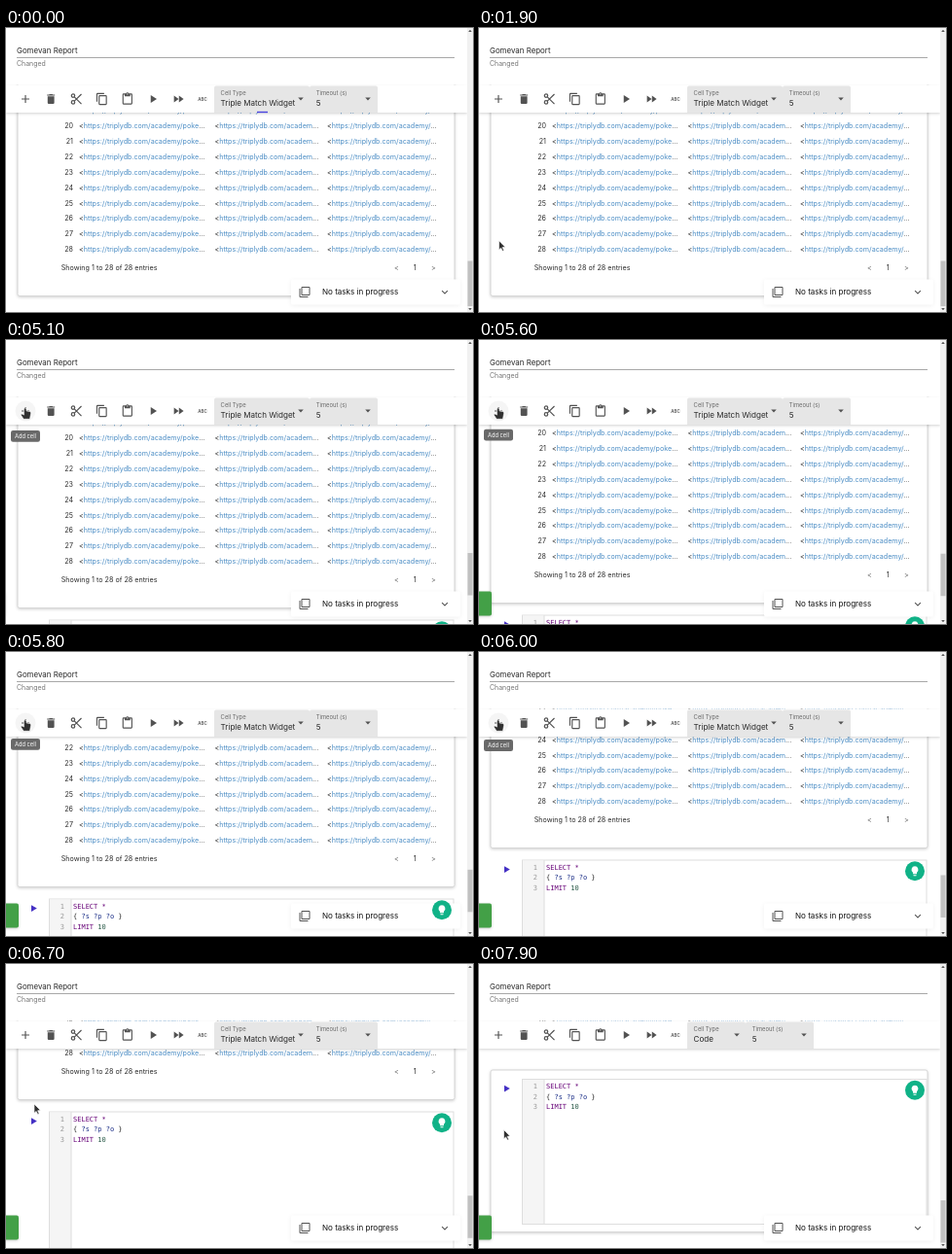
Recreate the animation shown at these times as an HTML page. Size 480 by 292 pixels, loop 8000 ms.

```html
<!DOCTYPE html>
<html lang="en">
<head>
<meta charset="utf-8">
<title>Notebook report</title>
<style>
  html, body { margin: 0; width: 100%; height: 100%; overflow: hidden; background: #fff; }
  svg { display: block; width: 100vw; height: 100vh; font-family: Inter, sans-serif; }
  text { fill: #2a2a2a; white-space: pre; }
  .code { font: 7px "DejaVu Sans Mono", monospace; }
  .label { font-size: 5.9px; fill: #6a6a6a; }
  .value { font-size: 8.05px; }
  .icon { fill: #525252; }
  .raised { filter: drop-shadow(0 1px 1.5px rgba(0, 0, 0, .18)); }
  .kw { fill: #660077; }
  .var { fill: #1c2f88; }
  .num { fill: #2a5a48; }
  .link { fill: #4a8cc4; }
</style>
</head>
<body>
<svg viewBox="0 0 480 292" preserveAspectRatio="none">
  <g id="page">
    <rect id="card" class="raised" x="12" width="449" rx="2" fill="#fff" stroke="#d6d6d6"/>
    <g id="table">
      <g id="rows" font-size="7.14"></g>
      <text x="56.7" y="249.2" font-size="7.2">Showing 1 to 28 of 28 entries</text>
      <g font-size="7.2" text-anchor="middle">
        <text x="401.5" y="249.2" style="fill:#666">&lt;</text>
        <text x="420.2" y="249.2">1</text>
        <text x="439.5" y="249.2" style="fill:#666">&gt;</text>
      </g>
    </g>
    <g id="cell" transform="translate(0 288)">
      <rect x="44.5" y="0" width="415.5" height="149" fill="#fff" stroke="#dedede"/>
      <rect x="45" y=".5" width="22" height="148" fill="#f5f5f5"/>
      <path d="M67 0v149" stroke="#ddd"/>
      <path d="M26 6.3l5.8 3.3-5.8 3.3z" fill="#4430c4"/>
      <g id="numbers" class="code" text-anchor="end"></g>
      <text class="code" x="69" y="9.5"><tspan class="kw">SELECT</tspan> <tspan class="kw">*</tspan></text>
      <text class="code" x="69" y="20"><tspan>{ </tspan><tspan class="var">?s ?p ?o</tspan><tspan> }</tspan></text>
      <text class="code" x="69" y="30.5"><tspan class="kw">LIMIT</tspan> <tspan class="num">10</tspan></text>
    </g>
  </g>

  <rect class="raised" y="59" width="474" height="28" fill="#fff"/>
  <rect width="474" height="58.5" fill="#fff"/>
  <text x="11" y="25.6" font-size="7.9">Gomevan Report</text>
  <path d="M11 30.5h450" stroke="#a8a8a8"/>
  <text x="11" y="39.2" font-size="6.95" style="fill:#757575">Changed</text>
  <circle id="hover" cx="20" cy="73" r="10.5" fill="#000"/>
  <g id="tools"></g>
  <text x="202" y="74.6" font-size="4.4" font-weight="600" text-anchor="middle" style="fill:#525252">ABC</text>

  <path id="typeBox" fill="#e6e6e6"/>
  <path id="focus" stroke="#4a45e0" stroke-width="1.4"/>
  <text class="label" x="220.6" y="68.8">Cell Type</text>
  <text id="typeName" class="value" x="220.6" y="80"></text>
  <path id="typeArrow" class="icon" d="M-2.8-1.4h5.6l-2.8 2.8z"/>
  <g id="timeout">
    <path d="M312 87V61.5q0-2 2-2h66q2 0 2 2V87z" fill="#e6e6e6"/>
    <text class="label" x="318.7" y="68.8">Timeout (s)</text>
    <text class="value" x="318.7" y="80.2">5</text>
    <path class="icon" d="M369.2 71.6h5.6l-2.8 2.8z"/>
  </g>

  <rect x="293" y="258.5" width="174" height="26" rx="2" fill="#fff" style="filter:drop-shadow(0 1px 2px rgba(0,0,0,.06))"/>
  <g id="panelIcons"></g>
  <text class="value" x="325" y="274.4" style="fill:#111">No tasks in progress</text>

  <g id="hint">
    <circle r="10" fill="#10b287"/>
    <path transform="scale(.5) translate(-12 -12)" fill="#fff" d="M9 20h6v1q0 1-1 1h-4q-1 0-1-1zM12 2a7 7 0 0 0-4 12.7V17q0 1 1 1h6q1 0 1-1v-2.3A7 7 0 0 0 12 2z"/>
  </g>
  <rect id="snack" class="raised" x="-20" y="258.5" width="33" height="25" rx="2" fill="#43a047"/>

  <rect x="474" width="6" height="292" fill="#f1f1f1"/>
  <rect id="thumb" x="474.5" width="5" fill="#c1c1c1"/>
  <path d="M475.2 4l1.8-2.2L478.8 4zM475.2 288l1.8 2.2 1.8-2.2z" fill="#555"/>

  <g id="tip">
    <rect x="5" y="93" width="30" height="11.8" rx="2.2" fill="#616161" opacity=".95"/>
    <text x="20" y="101" font-size="5.7" text-anchor="middle" style="fill:#fff">Add cell</text>
  </g>
  <g id="cursor" stroke="#fff" stroke-width=".6" stroke-linejoin="round">
    <path id="arrow" fill="#303030" d="M0 0V9.2L2.1 7.4 3.7 10.6 5.1 9.9 3.6 6.8 6.4 6.4z"/>
    <path id="hand" fill="#303030" d="M-1.3 1q1.3-1.6 2.6 0v2.2l3.5.7q1.4.5 1.1 2L4.8 11.6H-1.6L-4.4 7.4q.2-1.6 1.8-.8L-1.3 7.4z"/>
    <path id="beam" fill="none" stroke="#333" stroke-width=".8" d="M-1.8-4.5Q0-4.5 0-3.5V3.5Q0 4.5-1.8 4.5M1.8-4.5Q0-4.5 0-3.5M0 3.5Q0 4.5 1.8 4.5"/>
  </g>
</svg>
<script>
const LOOP = 8000, STEP = 100;
const NEW_CELL = 5100, SELECT_CELL = 7600;
const $ = id => document.getElementById(id);
const set = (id, attrs) => {
  for (const k in attrs) $(id).setAttribute(k, attrs[k]);
};
const show = (id, on) => set(id, { visibility: on ? 'visible' : 'hidden' });

// time, scroll offset
const SCROLL = [[5500, 0], [5600, 5], [5700, 17], [5800, 34], [6000, 74], [6200, 109.5],
  [6300, 122], [6400, 131], [6500, 136], [6700, 136], [6800, 139], [7000, 156], [7200, 169.5]];
// time, x, y
const POINTER = [[1600, 10, 232], [1700, 12, 228], [2100, 29, 209.5], [2700, 29, 209.5],
  [3000, 27, 182], [3300, 23, 122], [3600, 19, 91], [3800, 19.7, 69.7], [6000, 19.7, 69.7],
  [6200, 23, 99.5], [6700, 29, 144], [7200, 24, 171.5], [7800, 24, 171.5], [7900, 25.5, 170.5]];
// time, opacity, vertical shift while the page scrolls
const TIP = [[3900, 0, 0], [4200, 1, 0], [5500, 1, 0], [5800, 1, -4], [6200, 1, -1.8], [6300, 1, -1], [6500, 0, 0]];
const SNACK = [[5100, -14], [5300, 0]];

function at(track, t) {
  const i = track.findIndex(k => k[0] > t);
  if (i === 0) return track[0].slice(1);
  if (i < 0) return track[track.length - 1].slice(1);
  const a = track[i - 1], b = track[i], p = (t - a[0]) / (b[0] - a[0]);
  return a.slice(1).map((v, j) => v + (b[j + 1] - v) * p);
}

const icon = (x, y, size, body) =>
  `<g class="icon" transform="translate(${x - size / 2} ${y - size / 2}) scale(${size / 24})">${body}</g>`;
const path = d => `<path d="${d}"/>`;

const tools = [
  path('M19 13h-6v6h-2v-6H5v-2h6V5h2v6h6z'),
  path('M6 19q0 2 2 2h8q2 0 2-2V7H6zM19 4h-3.5l-1-1h-5l-1 1H5v2h14z'),
  `<g fill="none" stroke="#525252" stroke-width="2.1"><circle cx="6" cy="6" r="3"/>
   <circle cx="6" cy="18" r="3"/><path d="M8.2 8.2L21 21M8.2 15.8L21 3.2"/></g>`,
  path('M16 1H4Q2 1 2 3v14h2V3h12zM19 5H8Q6 5 6 7v14q0 2 2 2h11q2 0 2-2V7q0-2-2-2zm0 16H8V7h11z'),
  path('M19 2h-4.2a3 3 0 0 0-5.6 0H5Q3 2 3 4v16q0 2 2 2h14q2 0 2-2V4q0-2-2-2zm-7 0a1 1 0 0 1 0 2 1 1 0 0 1 0-2zm7 18H5V4h2v3h10V4h2z'),
  path('M8 5v14l11-7z'),
  path('M4 18l8.5-6L4 6zM13 6v12l8.5-6z')
];
$('tools').innerHTML = tools.map((d, i) => icon(20 + 26.2 * i, 73, 13.65, d)).join('');
$('panelIcons').innerHTML =
  icon(307, 271.5, 12, path('M3 5H1v16q0 2 2 2h16v-2H3zM21 1H7Q5 1 5 3v14q0 2 2 2h14q2 0 2-2V3q0-2-2-2zm0 16H7V3h14z')) +
  icon(451, 271.5, 13, path('M16.6 8.6L12 13.2 7.4 8.6 6 10l6 6 6-6z'));

const base = 'https://triplydb.com/';
const columns = [[75, 'academy/poke'], [214.5, 'academ'], [330, 'academy/']];
let rows = '';
for (let n = 19; n <= 28; n++) {
  const y = 103.2 + 15.87 * (n - 20);
  rows += `<text x="69" y="${y}" text-anchor="end">${n}</text>`;
  for (const [x, end] of columns)
    rows += `<text x="${x}" y="${y}">&lt;<tspan class="link">${base}${end}</tspan>...</text>`;
}
$('rows').innerHTML = rows;
$('numbers').innerHTML = [1, 2, 3].map(n =>
  `<text x="60" y="${10.5 * n - 1}" style="fill:#999">${n}</text>`).join('');

function render(t) {
  const [scroll] = at(SCROLL, t);
  const added = t >= NEW_CELL, selected = t >= SELECT_CELL;

  set('page', { transform: `translate(0 ${-scroll})` });
  set('card', selected ? { y: 278.5, height: 166.5 } : { y: -20, height: 295.5 });
  show('cell', added);
  show('hint', added);
  set('hint', { transform: `translate(448 ${299.3 - scroll})` });
  set('thumb', added ? { y: 219 + scroll * 24 / 169.5, height: 43.5 } : { y: 239.5, height: 46.5 });

  const right = selected ? 274 : 312;
  set('typeBox', { d: `M214 87V61.5q0-2 2-2H${right - 2}q2 0 2 2V87z` });
  set('typeArrow', { transform: `translate(${right - 9} 73)` });
  set('timeout', { transform: `translate(${right - 312} 0)` });
  $('typeName').textContent = selected ? 'Code' : 'Triple Match Widget';

  const half = Math.max(0, 5.5 - t * .04);
  set('focus', { d: `M${263.5 - half} 86.5h${2 * half}` });
  show('focus', half > 0);

  show('snack', added);
  set('snack', { transform: `translate(${at(SNACK, t)[0]} 0)` });
  const [opacity, shift] = at(TIP, t);
  set('tip', { opacity, transform: `translate(0 ${shift})` });

  const [x, y] = at(POINTER, t);
  const shape = t < 1700 ? '' : t >= 3800 && t <= 6000 ? 'hand' : t > 6000 && t <= 6300 ? 'beam' : 'arrow';
  set('cursor', { transform: `translate(${x} ${y})` });
  for (const id of ['arrow', 'hand', 'beam']) show(id, id === shape);
  set('hover', { opacity: shape === 'hand' ? .04 : 0 });
}

const start = performance.now();
function tick(now) {
  const t = Math.max(0, now - start) % LOOP;
  render(Math.floor(t / STEP) * STEP);
  requestAnimationFrame(tick);
}
render(0);
requestAnimationFrame(tick);
</script>
</body>
</html>
```
